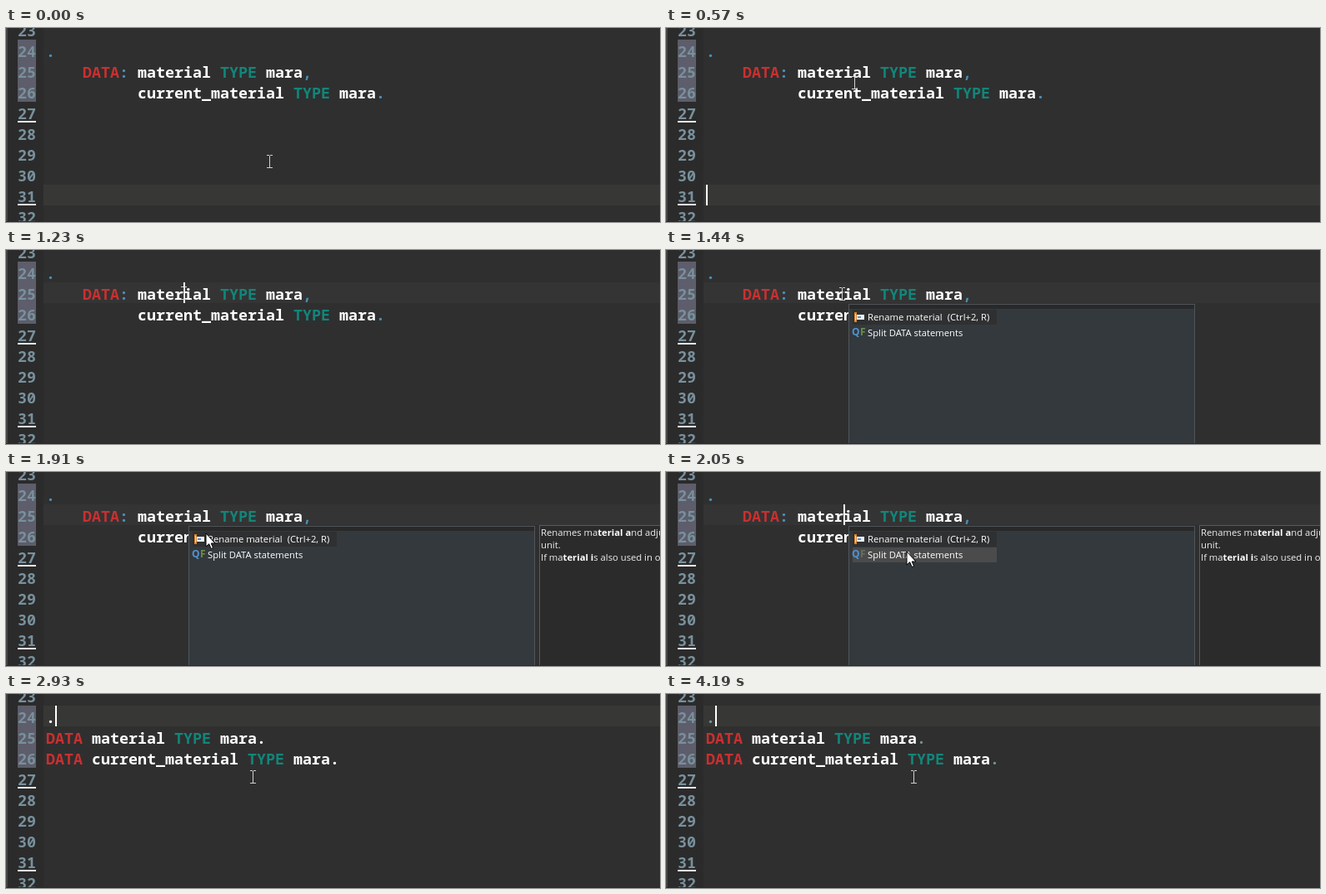
Animation, 785 px wide and 234 px high, one loop 4320 ms. Source, as an HTML page with a canvas:

```html
<!DOCTYPE html>
<html lang="en">
<head>
<meta charset="utf-8">
<title>Splitting a chained declaration</title>
<style>
  html, body { margin: 0; width: 100%; height: 100%; overflow: hidden; background: #2f2f2f; }
  canvas { display: block; }
</style>
</head>
<body>
<canvas id="stage" width="785" height="234"></canvas>
<script>
const ctx = document.getElementById('stage').getContext('2d');
const LOOP = 4320, TICK = 70;
const COL = 11, LEFT = 48, ROW = 25;
const CODE = '600 18.33px "Noto Sans Mono", monospace';
const UI = '11.25px "Open Sans", sans-serif';
const UI_BOLD = 'bold ' + UI;
const RED = '#c93030', TEAL = '#11867a', BLUE = '#4a90b8', WHITE = '#ffffff';

// Times of the events within the loop, in ms
const CLICK = 910, POPUP = 1300, INFO = 1840, HOVER = 1980,
      PRESS = 2590, APPLY = 2850, BEAM = 2930, RECOLOR = 3840;

const between = (t, from, to) => t >= from && t < to;
const rowTop = line => 14 + (line - 24) * ROW;

function rect(x, y, w, h, color) {
  ctx.fillStyle = color;
  ctx.fillRect(x, y, w, h);
}

function text(str, x, y, color, font) {
  ctx.font = font;
  ctx.fillStyle = color;
  ctx.fillText(str, x, y);
  return x + ctx.measureText(str).width;
}

// Draws [string, color] pieces on the character grid
function codeLine(line, col, pieces) {
  for (const [str, color] of pieces) {
    text(str, LEFT + col * COL, rowTop(line) + 21, color, CODE);
    col += str.length;
  }
}

function drawGutter() {
  rect(0, 0, 2, 234, '#454545');
  rect(2, 0, 43, 234, '#2b2b2b');
  rect(14, rowTop(24), 22, 3 * ROW, '#5d5d6b');
  for (let n = 23; n <= 32; n++) text(n, 14, rowTop(n) + 21, '#78909c', CODE);
  for (const n of [27, 31]) rect(14, rowTop(n) + 23, 22, 2, '#f0f0f0');
}

function drawCode(t) {
  const line = t < CLICK ? 31 : t < APPLY ? 25 : 24;
  rect(45, rowTop(line), 740, ROW, line === 25 ? '#343434' : '#373836');
  if (t < APPLY) {
    codeLine(24, 0, [['.', BLUE]]);
    codeLine(25, 4, [['DATA', RED], [': ', BLUE], ['material ', WHITE], ['TYPE ', TEAL], ['mara', WHITE], [',', BLUE]]);
    codeLine(26, 10, [['current_material ', WHITE], ['TYPE ', TEAL], ['mara', WHITE], ['.', BLUE]]);
  } else {
    const dot = ['.', t < RECOLOR ? WHITE : '#78909c'];
    codeLine(24, 0, [dot]);
    ['material ', 'current_material '].forEach((name, i) =>
      codeLine(25 + i, 0, [['DATA ', RED], [name, WHITE], ['TYPE ', TEAL], ['mara', WHITE], dot]));
  }
}

function drawCaret(t) {
  if (between(t, 350, 880)) rect(48, rowTop(31), 2, ROW, WHITE);
  if (between(t, CLICK, 1440) || between(t, 1980, 2520)) rect(213, rowTop(25), 2, ROW, WHITE);
  if (t >= APPLY) rect(59, rowTop(24), 2, ROW, WHITE);
}

function drawPopup(t) {
  const pressed = t >= PRESS, hovered = t >= HOVER;
  rect(219, 65, 416, 169, '#50555a');
  rect(220, 66, 414, 168, '#34393d');
  rect(220, 66, 414, 5, pressed ? '#000000' : '#292929');

  if (!pressed) rect(224, 72, 173, 18, '#2f3031');
  if (hovered) rect(224, 91, 173, 18, pressed ? '#5d5e5a' : '#4b4b4b');

  rect(226, 75, 3, 12, '#d9822b');
  rect(227, 77, 1, 8, '#f3d9b0');
  rect(229, 78, 9, 6, '#eceff1');
  rect(230, 80, 4, 2, '#5b8fc7');
  const end = text('Rename material', 242, 85, WHITE, UI);
  text('(Ctrl+2, R)', end + 6, 85, pressed ? '#808487' : WHITE, UI);

  text('Q', 223, 103, '#4f93d2', 'bold 12px "Open Sans", sans-serif');
  if (!pressed) text('F', 233, 103, hovered ? '#68705f' : '#6d8f45', 'bold 12px "Open Sans", sans-serif');
  text('Split DATA statements', 242, 104, WHITE, UI);

  if (pressed) {
    ctx.strokeStyle = '#b8b39a';
    ctx.setLineDash([1, 1]);
    ctx.strokeRect(240.5, 91.5, 124, 17);
    ctx.setLineDash([]);
  }
}

function drawInfo() {
  rect(640, 64, 145, 170, '#5a5a5a');
  rect(641, 65, 144, 169, '#2b2b2b');
  const mixed = (y, start, bold, rest) => {
    let x = text(start, 642, y, '#f0f0f0', UI);
    x = text(bold, x, y, WHITE, UI_BOLD);
    text(rest, x, y, '#f0f0f0', UI);
  };
  mixed(77, 'Renames ma', 'terial a', 'nd adjusts');
  text('unit.', 642, 92, '#f0f0f0', UI);
  mixed(107, 'If ma', 'terial i', 's also used in other');
}

function pointerAt(t) {
  const path = [[0, 316, 161], [70, 314, 158], [350, 262, 98], [570, 224, 64],
    [830, 213, 52], [1230, 213, 52], [1300, 211, 53], [1770, 211, 53],
    [1910, 245, 78], [1980, 278, 93], [2050, 293, 97], [2120, 294, 98],
    [2850, 294, 98], [2930, 296, 100], [4120, 296, 100], [4190, 297, 100], [LOOP, 297, 100]];
  const now = Math.floor(t / TICK + 0.15) * TICK;
  const i = Math.max(1, path.findIndex(p => p[0] >= now));
  const [t0, x0, y0] = path[i - 1], [t1, x1, y1] = path[i];
  const k = Math.min(1, (now - t0) / (t1 - t0));
  return [Math.round(x0 + (x1 - x0) * k), Math.round(y0 + (y1 - y0) * k)];
}

function drawPointer(t) {
  const [x, y] = pointerAt(t);
  if (between(t, 1900, BEAM)) {
    ctx.beginPath();
    for (const [dx, dy] of [[0, 0], [0, 16], [3.7, 12.7], [6.2, 18.5], [8.6, 17.5], [6.2, 12], [11, 12]])
      ctx.lineTo(x + dx, y + dy);
    ctx.closePath();
    ctx.fillStyle = WHITE;
    ctx.fill();
    ctx.strokeStyle = '#000000';
    ctx.stroke();
  } else {
    const color = '#d0d0d0';
    rect(x, y - 7, 1, 15, color);
    for (const dy of [-8, 7]) {
      rect(x - 3, y + dy, 3, 1, color);
      rect(x + 1, y + dy, 3, 1, color);
    }
  }
}

function draw(t) {
  rect(0, 0, 785, 234, '#2f2f2f');
  drawGutter();
  drawCode(t);
  drawCaret(t);
  if (between(t, POPUP, APPLY)) drawPopup(t);
  if (between(t, INFO, APPLY)) drawInfo();
  rect(0, 233, 785, 1, '#292929');
  drawPointer(t);
}

const start = performance.now();
function frame() {
  draw((performance.now() - start) % LOOP);
  requestAnimationFrame(frame);
}
frame();
</script>
</body>
</html>
```
